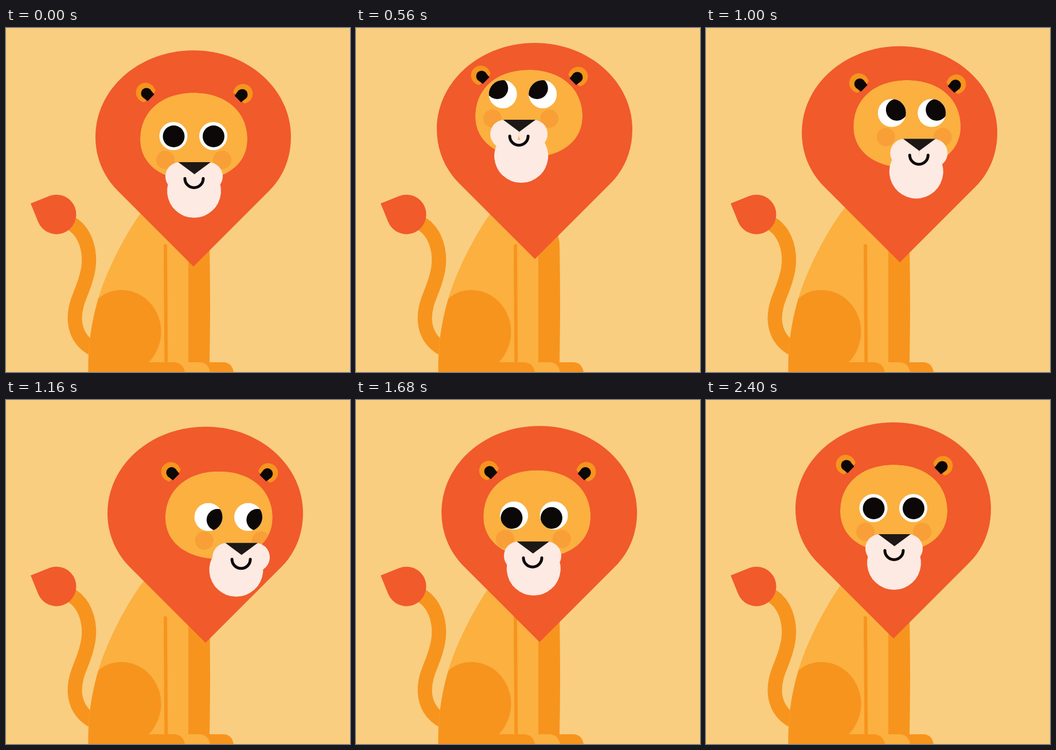
Recreate the animation shown at these times as an HTML page. Size 600 by 600 pixels, loop 2440 ms.

```html
<!DOCTYPE html>
<html lang="en">
<head>
<meta charset="utf-8">
<title>Lion looking around</title>
<style>
  html, body { margin: 0; width: 100%; height: 100%; overflow: hidden; background: #f9ce80; }
  svg { display: block; width: 100%; height: 100%; }
  .light { fill: #fbb040; }
  .dark { fill: #f7941e; }
  .red { fill: #f15a2b; }
  .black { fill: #0c0807; }
  .pale { fill: #fceae3; }
  .line { fill: none; stroke: #f7941e; stroke-linecap: round; }
</style>
</head>
<body>
<svg viewBox="0 0 600 600">
  <defs>
    <path id="faceShape" d="M327.500 113C384 113 421 146 421 194C421 240 380 266 327.500 266C275 266 234 240 234 194C234 146 271 113 327.500 113Z"/>
    <clipPath id="faceClip"><use href="#faceShape"/></clipPath>
    <clipPath id="eyeClip"><circle cx="292" cy="188.500" r="24.500"/><circle cx="361.500" cy="188.500" r="24.500"/></clipPath>
    <g id="ear">
      <path class="dark" d="M-15.500 5A17 17 0 1 1 15.500 5Q15 8.500 12 8.500H-12Q-15 8.500 -15.500 5Z"/>
      <path class="black" d="M-8 11L-9.500 0A9.500 9.500 0 0 1 9.500 0L8 11Z"/>
    </g>
  </defs>

  <path class="line" stroke-width="25" d="M108 338C140 352 152 395 140 435C132 465 120 478 120 508C121 530 130 548 152 560"/>
  <path class="red" d="M43 306L75.500 293A34.500 34.500 0 1 1 56 338Z"/>
  <path class="light" d="M143 600C143 560 147 520 161 472C174 427 205 365 234 324L265 285H320V600Z"/>
  <path class="dark" d="M318 600V340H338Q355 360 355 378Q357 480 355 583H380Q394 584 397 600Z"/>
  <path class="light" d="M317 583H338Q353 584 356 600H317Z"/>
  <path class="line" stroke-width="6" d="M278 380L279.300 590"/>
  <path class="dark" d="M161 472Q178 457 201 457C240 457 270.500 490 270.500 530C270.500 550 262 570 249 583H293Q309 584 312 600H144C143 560 147 520 161 472Z"/>

  <g id="mane">
    <path class="red" d="M327 416L195 284C170 259 156 226 156 190C156 106 232 39 327 39C421 39 497 106 497 190C497 226 484 259 459 284Z"/>
  </g>
  <g id="ears">
    <use href="#ear" transform="translate(245 114) rotate(-45)"/>
    <use href="#ear" transform="translate(412 116) rotate(45)"/>
  </g>
  <g id="face" clip-path="url(#faceClip)">
    <use href="#faceShape" class="light"/>
    <g id="cheeks" fill="#f89f37"><circle cx="278" cy="230" r="16"/><circle cx="377" cy="230" r="16"/></g>
  </g>
  <g id="eyes" clip-path="url(#eyeClip)">
    <path fill="#fff" d="M260 160H395V220H260Z"/>
    <g id="pupils" class="black"><circle cx="292.500" cy="189" r="19"/><circle cx="362" cy="189" r="19"/></g>
  </g>
  <g id="chin">
    <path class="pale" d="M290.300 256A47 47 0 1 0 365.700 256Z"/>
  </g>
  <g id="muzzle">
    <g class="pale"><circle cx="303" cy="259" r="25"/><circle cx="353" cy="259" r="25"/></g>
    <path fill="#1d1815" d="M300.500 234H357L328.700 255Z"/>
    <path fill="none" stroke="#0c0807" stroke-width="5" stroke-linecap="round" d="M312 262.500A16 16 0 0 0 344 262.500"/>
  </g>
</svg>
<script>
const LOOP = 2440, STEP = 40;

// Gaze direction over time: [ms, -1..1]
const gazeX = [[0, 0], [360, -1], [560, -.577], [880, -.077], [1130, 1], [1160, .955],
  [1480, .19], [1700, -.27], [1920, 0], [LOOP, 0]];
const gazeY = [[0, 0], [360, -1], [880, -1], [1120, .28], [1160, .6], [1320, 1],
  [1480, .8], [1680, .5], [1920, 0], [LOOP, 0]];

// Reach of each part in px: left, right, up, down (cheeks and pupils relative to their parent)
const reach = {
  mane: [26, 22, 13, 12.5],
  ears: [45, 46, 30, 21],
  face: [45, 46, 40, 19],
  cheeks: [24, 25, 32, 6],
  eyes: [62, 64, 73, 26],
  pupils: [18, 16, 11, 7.5],
  chin: [69, 77, 61, 20],
  muzzle: [76, 86, 74, 25.5]
};
const parts = Object.entries(reach).map(([id, r]) => [document.getElementById(id), r]);

const slope = (keys, i) => (keys[i + 1][1] - keys[i][1]) / (keys[i + 1][0] - keys[i][0]);

// Zero at turning points, so the curve never overshoots a key
function tangent(keys, i) {
  if (i === 0 || i === keys.length - 1) return 0;
  const a = slope(keys, i - 1), b = slope(keys, i);
  return a * b > 0 ? 2 * a * b / (a + b) : 0;
}

function sample(keys, t) {
  const i = keys.findIndex((key, n) => n && t <= key[0]) - 1;
  const [t0, v0] = keys[i], [t1, v1] = keys[i + 1];
  const span = t1 - t0, u = (t - t0) / span, w = 1 - u;
  return v0 * w * w * (1 + 2 * u) + v1 * u * u * (3 - 2 * u)
    + span * u * w * (w * tangent(keys, i) - u * tangent(keys, i + 1));
}

function draw(now) {
  const t = Math.floor(now % LOOP / STEP) * STEP;
  const x = sample(gazeX, t), y = sample(gazeY, t);
  for (const [el, [left, right, up, down]] of parts) {
    el.setAttribute('transform', `translate(${x * (x < 0 ? left : right)} ${y * (y < 0 ? up : down)})`);
  }
}

let start;
function frame(now) {
  start ??= now;
  draw(now - start);
  requestAnimationFrame(frame);
}
draw(0);
requestAnimationFrame(frame);
</script>
</body>
</html>
```
